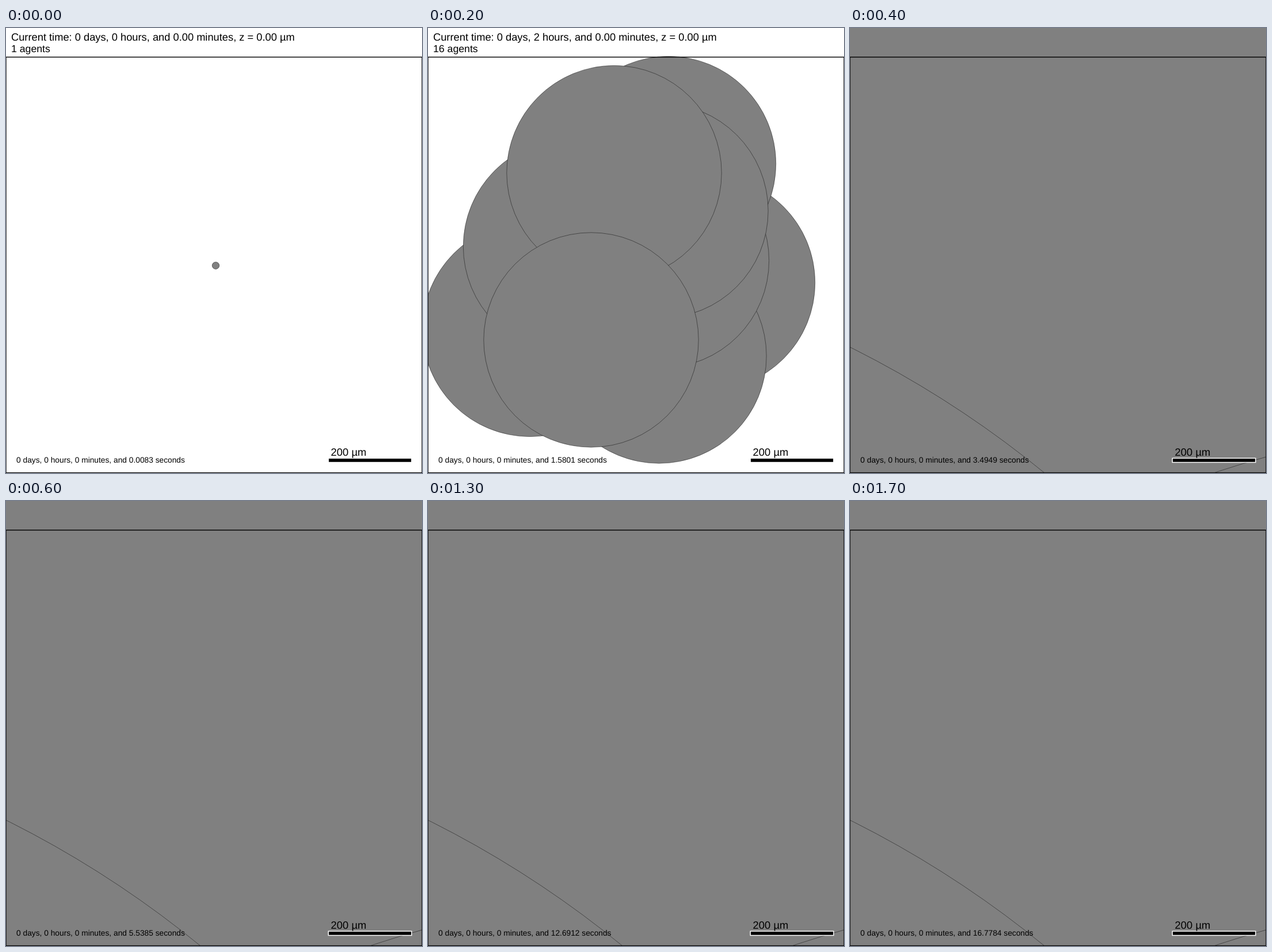
These frames come from a looping animation (723x774 px, 1.8 s). An HTML page:

```html
<!DOCTYPE html>
<html lang="en">
<head>
<meta charset="utf-8">
<title>Cell growth</title>
<style>
  html, body { margin: 0; width: 100%; height: 100%; overflow: hidden; background: #fff; }
  svg { display: block; width: 723px; height: 774px; }
  text { font-family: "Liberation Sans", Arial, sans-serif; fill: #000; text-rendering: geometricPrecision; }
  circle { fill: #808080; stroke: #000; stroke-width: .45; }
  rect { stroke-width: 1.45; }
</style>
</head>
<body>
<svg viewBox="0 0 723 774">
  <text id="clock" x="9" y="22" font-size="18.3"></text>
  <text id="count" x="9" y="42" font-size="17.7"></text>
  <rect id="cover" width="723" height="774" fill="#808080"/>
  <g id="cells"></g>
  <rect x="560.3" y="748.3" width="144.6" height="7.2" stroke="#fff"/>
  <text x="564.6" y="744" font-size="18.4">200 µm</text>
  <text id="timer" x="18.1" y="756" font-size="13.75"></text>
  <rect y="50.6" width="723" height="723" fill="none" stroke="#000"/>
</svg>
<script>
const STEP = 100, LOOP = 1800;
const $ = id => document.getElementById(id);

// Cells per hour: shared radius, then centres from back to front
const stages = [
  { r: 6.2, at: [[364.5, 413.2]] },
  { r: 30, at: [[389.5, 405.5], [334.5, 429.5], [364.2, 381], [402.5, 433.5]] },
  { r: 186.7, at: [
    [486, 443], [418, 236], [177, 524], [248, 380], [401.5, 570.5],
    [406, 404.5], [404.5, 318], [323.5, 252], [283.5, 542.5]
  ] },
  { r: 918, at: [[209, -702], [-484, 1080]] },
  { r: 1800, at: [[-803, 2166], [1206, 2480]] }
];

// Computing time speeds up while cells divide, then runs evenly
const seconds = h => h < 3
  ? .0083 + .7745 * h + .0057 * h * h
  : 2.4731 + 1.02181 * (h - 3);

let shown = -1;
function draw(ms) {
  const hour = Math.floor(ms % LOOP / STEP);
  if (hour === shown) return;
  shown = hour;
  const { r, at } = stages[Math.min(hour, stages.length - 1)];
  $("cells").innerHTML = at.map(([x, y]) => `<circle cx="${x}" cy="${y}" r="${r}"/>`).join("");
  $("cover").style.display = hour > 2 ? "" : "none";
  $("clock").textContent = `Current time: 0 days, ${hour} hours, and 0.00 minutes, z = 0.00 µm`;
  $("count").textContent = `${4 ** hour} agents`;
  $("timer").textContent = `0 days, 0 hours, 0 minutes, and ${seconds(hour).toFixed(4)} seconds`;
}

const start = performance.now();
function tick() {
  draw(performance.now() - start);
  requestAnimationFrame(tick);
}
tick();
</script>
</body>
</html>
```
